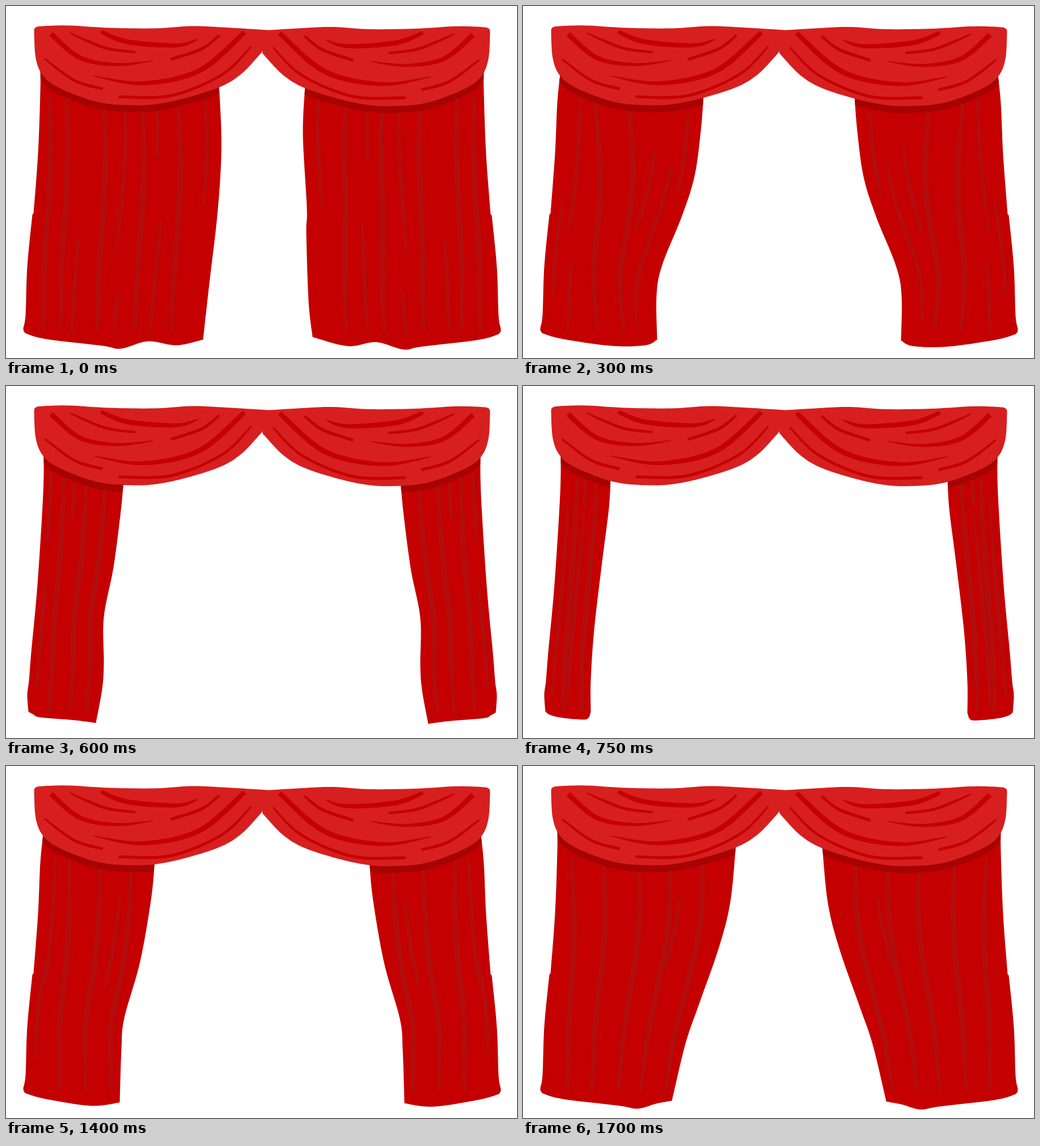
An HTML page with a canvas for the animation above (1850 ms loop, 901 by 622 pixels).

```html
<!DOCTYPE html>
<html lang="en">
<head>
<meta charset="utf-8">
<title>Stage curtain</title>
<style>
  html, body { margin: 0; width: 100%; height: 100%; overflow: hidden; background: #fff; }
  canvas { display: block; width: 901px; height: 622px; }
</style>
</head>
<body>
<canvas id="stage" width="901" height="622"></canvas>
<script>
const ctx = document.getElementById('stage').getContext('2d');
const color = { cloth: '#c50000', fold: '#b20d0d', valance: '#d71f1f', shade: '#a60303' };
const mix = (a, b, t) => a + (b - a) * t;

// A smooth curve through key points given as "x,y x,y".
function curve(text, steps = 10) {
  const points = text.split(' ').map(p => p.split(',').map(Number));
  const at = i => points[Math.min(Math.max(i, 0), points.length - 1)];
  const out = [];
  for (let i = 0; i < points.length - 1; i++) {
    for (let s = 0; s < steps; s++) {
      const t = s / steps;
      out.push([0, 1].map(k => {
        const [a, b, c, d] = [-1, 0, 1, 2].map(n => at(i + n)[k]);
        return b + t / 2 * (c - a + t * (2 * a - 5 * b + 4 * c - d + t * (3 * (b - c) + d - a)));
      }));
    }
  }
  return [...out, points.at(-1)];
}

function polygon(points) {
  const path = new Path2D();
  points.forEach(point => path.lineTo(...point));
  path.closePath();
  return path;
}

// A brush stroke along a line, its width going from start to end and swelling halfway.
function brush(line, start, end, swell) {
  const left = [], right = [];
  line.forEach(([x, y], i) => {
    const p = line[Math.max(i - 1, 0)], q = line[Math.min(i + 1, line.length - 1)];
    const t = i / (line.length - 1);
    const half = mix(start, end, t) / 2 + swell * 2 * t * (1 - t);
    const angle = Math.atan2(q[1] - p[1], q[0] - p[0]);
    const dx = -Math.sin(angle) * half, dy = Math.cos(angle) * half;
    left.push([x + dx, y + dy]);
    right.unshift([x - dx, y - dy]);
  });
  return polygon([...left, ...right]);
}

// Where an edge running down the cloth lies at height y.
function edgeX(edge, y) {
  const i = Math.max(1, edge.findIndex(p => p[1] >= y));
  const [a, b] = [edge[i - 1], edge[i]];
  return mix(a[0], b[0], (y - a[1]) / (b[1] - a[1]));
}

const valance = polygon([
  ...curve('49,46 51,38 65,35 113,34 180,38 262,39 325,35 380,37 461,42'),
  ...curve('450,82 415,119 378,142 320,161 270,172 225,175 160,169 95,145 65,123 52,92 49,46')
]);

const drapes = [
  brush(curve('79,49 130,91 195,103 260,96'), 9, 1, 2),
  brush(curve('112,47 140,60 180,75 228,81'), 2, 4, 2),
  brush(curve('167,45 215,63 300,69 339,58'), 6, 1, 5),
  brush(curve('153,123 240,136 340,114 420,46'), 1, 8, 4),
  brush(curve('290,94 345,75 376,51'), 5, 4, 1),
  brush(curve('198,160 290,158 380,121 432,71'), 5, 3, 1),
  brush(curve('68,93 120,131 170,146'), 3, 5, 1)
];

const seam = curve('46,368 37,460 34,545 30,570 34,578');
const wideEdge = [...curve('60,105 60,150 56,260 48,366'), ...seam];
const halfEdge = [...curve('66,112 60,170 56,260 48,366'), ...seam];
const slimEdge = curve('66,112 65,190 55,350 44,470 40,520 37,545 39,575');

// Folds sit at a share of the cloth's width. Long ones run its whole height and drift
// towards the inner edge; short ones are [share, top, bottom].
function cloth(outer, hem, inner, { long, drift, short }) {
  const side = curve(inner);
  const rising = [...side].reverse();
  const start = outer.at(-1).join();
  const bottom = curve([start, hem, side[0].join()].join(' '));
  const fold = (share, top, end, width, slide = 0) => {
    const line = Array.from({ length: 25 }, (_, i) => {
      const t = i / 24, y = mix(top, end, t);
      return [mix(edgeX(outer, y), edgeX(rising, y), share + slide * (t - 0.5)), y];
    });
    return brush(line, width * 0.6, width * 0.6, width * 0.4);
  };
  return {
    outline: polygon([...outer, ...bottom, ...side]),
    folds: [
      ...long.map(share => fold(share, 160, 574, 10, drift)),
      ...short.map(([share, top, end]) => fold(share, top, end, 7.5))
    ]
  };
}

const closedFolds = {
  long: [0.08, 0.175, 0.38, 0.59, 0.79], drift: 0.05,
  short: [[0.265, 410, 577], [0.475, 170, 435], [0.65, 170, 268], [0.7, 377, 577], [0.92, 160, 352], [0.5, 503, 577]]
};
const fullHem = '70,588 170,600 202,605 ';
const closedHem = fullHem + '250,592 300,599';
const closed = {
  left: cloth(wideEdge, closedHem, '347,589 358,490 371,380 378,290 379,220 375,138', closedFolds),
  right: cloth(wideEdge, closedHem, '362,583 369,520 373,400 372,355 379,225 375,138', closedFolds)
};

const symmetric = (...parts) => {
  const left = cloth(...parts);
  return { left, right: left };
};

const parting = symmetric(wideEdge, fullHem + '235,596', '262,591 286,490 310,420 345,320 365,240 375,138',
  { long: [0.14, 0.32, 0.52, 0.69, 0.875], drift: 0.12, short: [[0.71, 232, 351]] });

const half = symmetric(halfEdge, '70,588 155,600 215,599', '236,589 235,510 245,457 280,370 302,300 313,220 318,157',
  {
    long: [0.37, 0.6], drift: 0.23,
    short: [[0.16, 160, 395], [0.69, 250, 397], [0.82, 280, 562], [0.905, 185, 331], [0.085, 343, 508], [0.23, 452, 577]]
  });

const wide = symmetric(halfEdge, '70,588 150,600', '200,594 203,500 208,445 236,345 256,230 262,160',
  { long: [0.31, 0.58, 0.85], drift: 0.12, short: [[0.13, 160, 380], [0.72, 235, 390], [0.1, 343, 515]] });

const slim = symmetric(slimEdge, '48,580 60,585 120,590', '158,595 169,535 172,490 172,408 189,320 202,220 207,165',
  { long: [0.28, 0.565, 0.8], drift: 0.06, short: [[0.09, 150, 275], [0.39, 168, 234], [0.11, 345, 532]] });

const open = symmetric(slimEdge, '48,581 70,586 105,589 115,586', '119,575 119,520 125,430 139,310 151,215 154,160',
  { long: [0.37, 0.76], drift: 0.09, short: [[0.17, 200, 545], [0.5, 165, 213], [0.51, 225, 565]] });

// The curtain opens pose by pose, rests, and closes the same way back.
const poses = [closed, parting, half, wide, slim, open];
const step = 150, rest = 500;
const last = poses.length - 1;
const duration = (2 * last - 1) * step + rest;

function poseAt(time) {
  const opening = Math.min(last, Math.floor(time / step));
  const closing = Math.ceil((duration - time) / step);
  return poses[Math.min(opening, closing)];
}

function fill(paths, style) {
  ctx.fillStyle = style;
  paths.forEach(path => ctx.fill(path));
}

function drawSide({ outline, folds }) {
  fill([outline], color.cloth);
  ctx.save();
  ctx.clip(outline);
  fill(folds, color.fold);
  ctx.translate(0, 12);
  fill([valance], color.shade);
  ctx.restore();
  fill([valance], color.valance);
  fill(drapes, color.cloth);
}

function draw({ left, right }) {
  ctx.fillStyle = '#fff';
  ctx.fillRect(0, 0, 901, 622);
  ctx.save();
  ctx.translate(0.5, 0.5);
  drawSide(left);
  ctx.translate(902, 1.5);
  ctx.scale(-1, 1);
  drawSide(right);
  ctx.restore();
}

const origin = performance.now();
let shown;
function tick() {
  const pose = poseAt(Math.max(0, performance.now() - origin) % duration);
  if (pose !== shown) draw(shown = pose);
  requestAnimationFrame(tick);
}
tick();
</script>
</body>
</html>
```
